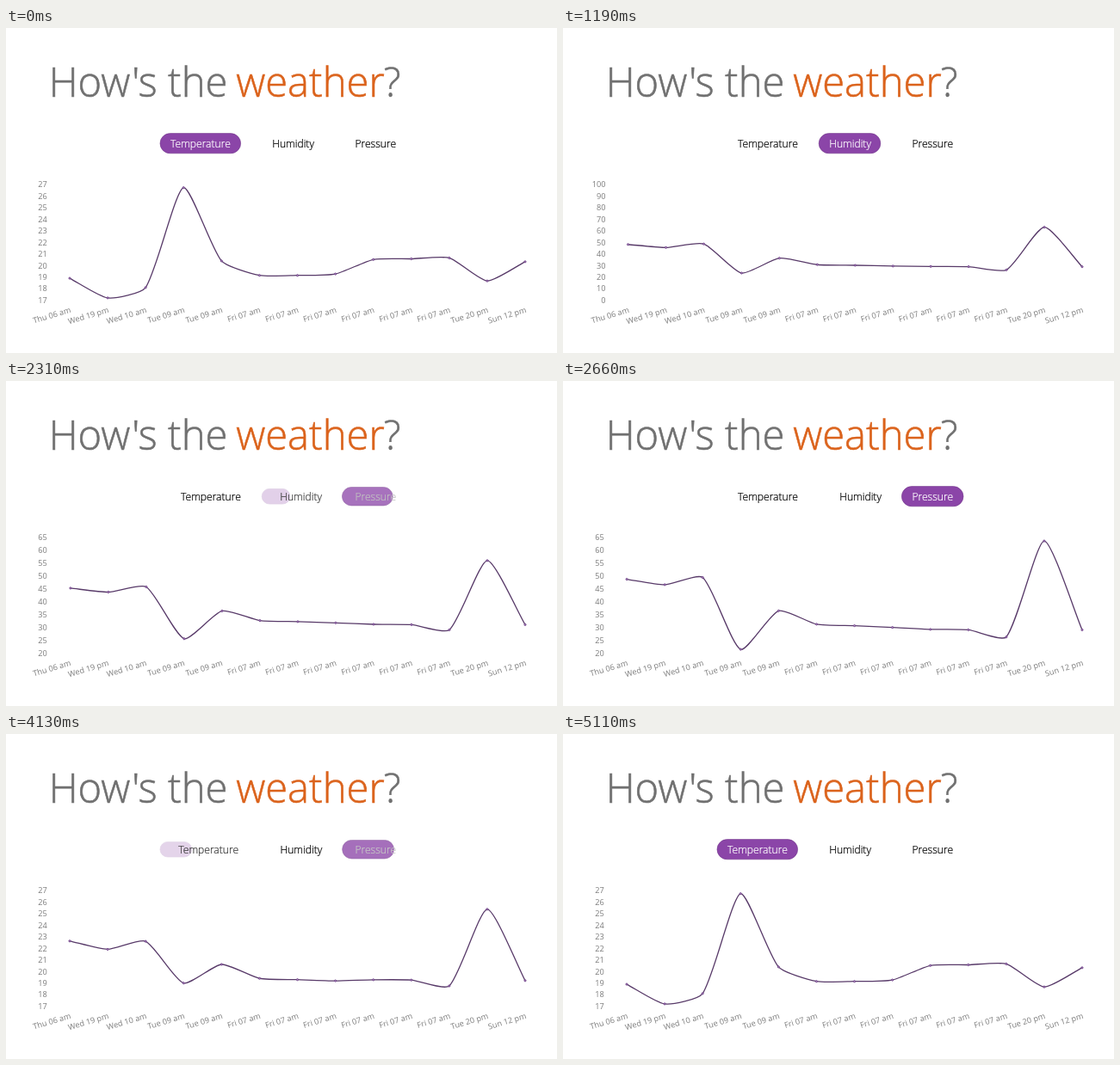
These frames come from a looping animation (640x378 px, 5.18 s). An HTML page:

```html
<!DOCTYPE html>
<html lang="en">
<head>
<meta charset="utf-8">
<title>How's the weather?</title>
<style>
  html, body { margin: 0; width: 100%; height: 100%; overflow: hidden; background: #fff; }
  svg { display: block; width: 640px; height: 378px; font-family: "Open Sans", sans-serif; }
  .title { font-size: 47.1px; font-weight: 300; fill: #707070; stroke: #707070; stroke-width: .6; }
  .accent { fill: #db631c; stroke: #db631c; }
  .tab { font-size: 12.1px; font-weight: 300; stroke-width: .22; }
  .pill { fill: #8b45a8; stroke: #743a8c; stroke-width: .6; }
  .axis { font-size: 9.2px; fill: #7c7c7c; }
  .line { fill: none; stroke: #583a69; stroke-width: 1.3; stroke-linejoin: round; }
  .dot { fill: #b295c0; stroke: #70418a; stroke-width: .9; }
</style>
</head>
<body>
<svg viewBox="0 0 640 378">
  <text class="title" y="80"><tspan x="49.7">How's the</tspan><tspan class="accent" x="267.2">weather</tspan><tspan x="438.8">?</tspan></text>
  <g id="tabs"></g>
  <g id="axes" class="axis"></g>
  <path id="line" class="line"/>
  <g id="dots"></g>
</svg>
<script>
const LOOP = 5180, CHART_MS = 1000, TAB_MS = 300;
const TOP = 182.2, BOTTOM = 316.6, RIGHT = 603, TENSION = .2;

const temperature = [18.9, 17.2, 18.1, 26.74, 20.4, 19.15, 19.15, 19.27, 20.52, 20.58, 20.66, 18.67, 20.33];
const humidity = [49.3, 47.1, 50, 20.9, 36.5, 31.1, 30.5, 29.8, 29, 28.8, 25.9, 64.8, 28.8];
const days = ['Thu 06 am', 'Wed 19 pm', 'Wed 10 am', 'Tue 09 am', 'Tue 09 am',
  ...Array(6).fill('Fri 07 am'), 'Tue 20 pm', 'Sun 12 pm'];

const views = [
  { name: 'Temperature', data: temperature, min: 17, max: 27, step: 1, left: 74, pill: 94 },
  { name: 'Humidity', data: humidity, min: 0, max: 100, step: 10, left: 75.6, pill: 72 },
  { name: 'Pressure', data: humidity, min: 20, max: 65, step: 5, left: 74, pill: 72 },
];
const clicks = [
  { at: 621, from: 0, to: 1 },
  { at: 2175, from: 1, to: 2 },
  { at: 4080, from: 2, to: 0 },
];

const byId = id => document.getElementById(id);
const mix = (a, b, p) => a + (b - a) * p;
const progress = (t, start, length) => Math.min(1, Math.max(0, (t - start) / length));
const easeOutQuart = p => 1 - (1 - p) ** 4;

function add(parent, tag, attrs, text = '') {
  const node = document.createElementNS('http://www.w3.org/2000/svg', tag);
  set(node, attrs);
  node.textContent = text;
  return parent.appendChild(node);
}
function set(node, attrs) {
  for (const key in attrs) node.setAttribute(key, attrs[key]);
}

// cubic-bezier(.25, .1, .25, 1)
function ease(p) {
  const bezier = (a, b, s) => 3 * a * s * (1 - s) ** 2 + 3 * b * s * s * (1 - s) + s ** 3;
  let lo = 0, hi = 1;
  for (let i = 0; i < 24; i++) {
    const mid = (lo + hi) / 2;
    if (bezier(.25, .25, mid) < p) lo = mid; else hi = mid;
  }
  return bezier(.1, 1, hi);
}

const pointX = (view, i) => mix(view.left, RIGHT, i / (days.length - 1));
const valueY = (view, v) => mix(BOTTOM, TOP, (v - view.min) / (view.max - view.min));

for (const view of views) {
  view.points = view.data.map((v, i) => [pointX(view, i), valueY(view, v)]);
  view.axis = add(byId('axes'), 'g', {});
  for (let v = view.min; v <= view.max; v += view.step) {
    add(view.axis, 'text', { x: view.left - 26.2, y: valueY(view, v), dy: '.35em', 'text-anchor': 'end' }, v);
  }
  days.forEach((day, i) => add(view.axis, 'text', {
    transform: `translate(${pointX(view, i) + 1} 327.8) rotate(-16.5)`,
    dy: '.32em', 'text-anchor': 'end',
  }, day));
  view.rect = add(byId('tabs'), 'rect', { class: 'pill' });
  view.label = add(byId('tabs'), 'text', { class: 'tab', y: 138.6 }, view.name);
}
const dots = days.map(() => add(byId('dots'), 'circle', { class: 'dot', r: 1.1 }));

// Spline whose handles are parallel to the neighbours' chord, shared out by segment length
function curve(points) {
  const handles = points.map((p, i) => {
    const a = points[i - 1] || p, b = points[i + 1] || p;
    const before = Math.hypot(p[0] - a[0], p[1] - a[1]);
    const after = Math.hypot(b[0] - p[0], b[1] - p[1]);
    const handle = length => p.map((v, k) => v + TENSION * length / (before + after) * (b[k] - a[k]));
    return { into: handle(-before), out: handle(after) };
  });
  return points.slice(1).reduce(
    (d, p, i) => `${d}C${handles[i].out} ${handles[i + 1].into} ${p}`, `M${points[0]}`);
}

function drawTabs(selected) {
  const textX = [203 - 12 * selected[0], 309.2 + 12 * selected[2], 405.4];
  views.forEach((view, i) => {
    const p = selected[i], height = mix(16, 23.2, p);
    set(view.rect, {
      x: textX[i] - 24 + 12 * p, y: 134.2 - height / 2,
      width: mix(20, view.pill - .4, p), height, rx: height / 2, opacity: p,
    });
    const shade = Math.round(255 * p), color = `rgb(${shade},${shade},${shade})`;
    set(view.label, { x: textX[i], fill: color, stroke: color });
  });
}

function draw(t) {
  const click = clicks.filter(c => c.at <= t).pop() || { at: -LOOP, from: 2, to: 0 };
  const moved = easeOutQuart(progress(t, click.at, CHART_MS));
  const switched = ease(progress(t, click.at, TAB_MS));
  const from = views[click.from], to = views[click.to];

  const points = to.points.map((end, i) => end.map((v, k) => mix(from.points[i][k], v, moved)));
  set(byId('line'), { d: curve(points) });
  points.forEach(([cx, cy], i) => set(dots[i], { cx, cy }));

  views.forEach(view => set(view.axis, { visibility: view === to ? 'visible' : 'hidden' }));
  drawTabs(views.map((_, i) => i === click.to ? switched : i === click.from ? 1 - switched : 0));
}

const start = performance.now();
function tick() {
  draw((performance.now() - start) % LOOP);
  requestAnimationFrame(tick);
}
tick();
</script>
</body>
</html>
```
